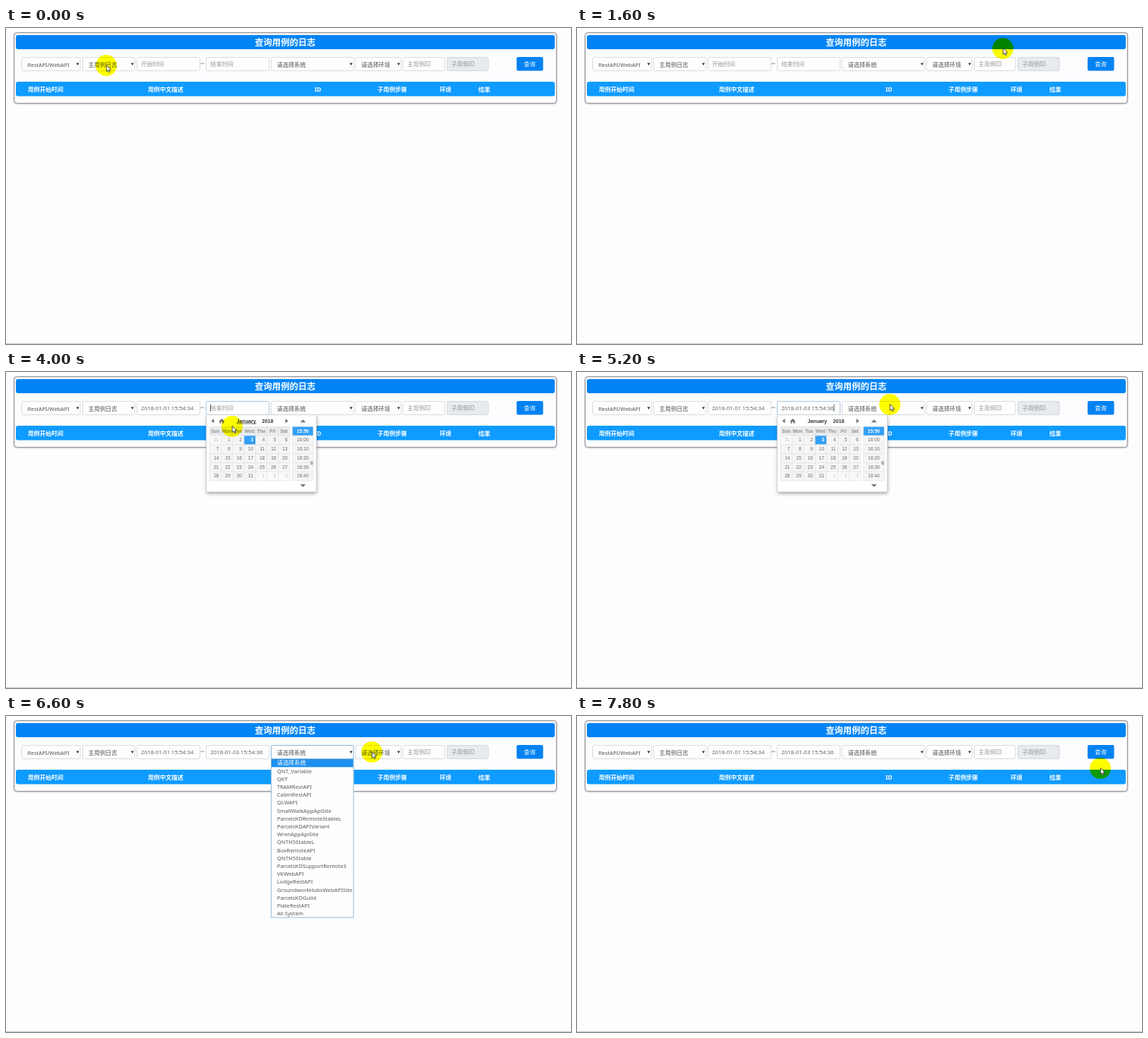
An HTML page with a canvas that plays this animation: 800x447 px, repeating every 8000 ms.

```html
<!DOCTYPE html>
<html lang="zh-CN">
<head>
<meta charset="utf-8">
<title>查询用例的日志</title>
<style>
html, body { margin: 0; width: 100%; height: 100%; overflow: hidden; background: #fdfcfe; }
canvas { display: block; width: 100%; height: 100%; }
</style>
</head>
<body>
<canvas id="stage"></canvas>
<script>
const W = 800, H = 447, LOOP = 8000, STEP = 200;
const SANS = '"Noto Sans", "Noto Sans CJK SC", sans-serif';
const ARIAL = '"Liberation Sans", Arial, sans-serif';
const canvas = document.getElementById('stage');
const ctx = canvas.getContext('2d');
const ratio = window.devicePixelRatio || 1;
canvas.width = Math.round(W * ratio);
canvas.height = Math.round(H * ratio);
ctx.scale(ratio, ratio);

// Pointer path: time, x, y
const path = [
  [0, 142, 53], [400, 290, 54], [800, 490, 53], [1200, 667, 52], [1400, 742, 51],
  [1600, 603, 29], [1800, 480, 40], [2000, 360, 48], [2200, 270, 52], [2400, 224, 53],
  [2600, 232, 64], [2800, 247, 86], [3000, 228, 95], [3200, 216, 98], [3400, 280, 66],
  [3600, 345, 50], [3800, 328, 52], [4000, 320, 77], [4400, 340, 95], [4600, 345, 98],
  [4800, 396, 74], [5000, 426, 54], [5200, 443, 46], [5400, 468, 48], [5600, 486, 51],
  [6000, 487, 54], [6200, 493, 54], [6600, 518, 51], [6800, 536, 47], [7200, 582, 15],
  [7400, 650, 34], [7600, 712, 59], [7800, 741, 74]
];

const systems = [
  '请选择系统', 'QNT_Variable', 'QKT', 'TRAMRestAPI', 'CabinRestAPI', 'QLWAPI',
  'SmallWalkAppApiSite', 'ParcelsKDRemoteStableL', 'ParcelsKDAPIVariant', 'WrenAppApiSite',
  'QNTH5StableL', 'BoxRemoteAPI', 'QNTH5Stable', 'ParcelsKDSupportRemote3', 'VKWebAPI',
  'LodgeRestAPI', 'GroundworkHubsWebAPISite', 'ParcelsKDGuild', 'PlateRestAPI', 'All System'
];

function pointerAt(t) {
  let i = 0;
  while (i < path.length - 1 && path[i + 1][0] <= t) i++;
  const a = path[i], b = path[i + 1] || a;
  const k = b === a ? 0 : (t - a[0]) / (b[0] - a[0]);
  return [a[1] + (b[1] - a[1]) * k, a[2] + (b[2] - a[2]) * k];
}

function text(str, x, y, color, size = 8.2, { bold = false, font = SANS, align = 'left' } = {}) {
  ctx.font = `${bold ? 'bold ' : ''}${size}px ${font}`;
  ctx.textAlign = align;
  ctx.fillStyle = color;
  ctx.fillText(str, x, y);
}

function rect(x, y, w, h, color) {
  ctx.fillStyle = color;
  ctx.fillRect(x, y, w, h);
}

function box(x, y, w, h, r, fill, stroke) {
  ctx.beginPath();
  ctx.roundRect(x, y, w, h, r);
  if (fill) { ctx.fillStyle = fill; ctx.fill(); }
  if (stroke) { ctx.strokeStyle = stroke; ctx.lineWidth = 1; ctx.stroke(); }
}

function poly(points, color) {
  ctx.beginPath();
  points.forEach(([x, y]) => ctx.lineTo(x, y));
  ctx.closePath();
  ctx.fillStyle = color;
  ctx.fill();
}

function withShadow(color, blur, dy, draw) {
  ctx.save();
  ctx.shadowColor = color;
  ctx.shadowBlur = blur * ratio;
  ctx.shadowOffsetY = dy * ratio;
  draw();
  ctx.restore();
}

function field(x, right, border = '#d9dbde', fill = '#fefefe') {
  box(x + 0.5, 41.5, right - x - 1, 19, 2, fill, border);
}

function select(x, right, label, size, open) {
  field(x, right, open ? '#80b5dc' : undefined);
  text(label, x + 8.5, 54.7, '#505050', size);
  poly([[right - 6, 49.5], [right - 2, 49.5], [right - 4, 53]], '#333');
}

function input(x, right, hint, value, focused) {
  field(x, right, focused ? '#a3c8e2' : undefined);
  text(value || hint, x + 6.3, 54, value ? '#606468' : '#92979c', value ? 7.85 : 8.2);
  if (focused) {
    const end = value ? ctx.measureText(value).width + 0.5 : 0;
    rect(x + 6 + end, 45.5, 0.8, 10.5, '#333');
  }
}

function page(t) {
  rect(0, 0, W, H, '#fdfcfe');
  rect(0, 446, W, 1, '#c9c9cb');
  withShadow('rgba(0,0,0,.28)', 2, 0.5, () => box(11.5, 6.5, 768, 100, 4, '#fdfcfe', '#98989b'));
  box(14, 10, 763, 20, 3, '#0084f5');
  text('查询用例的日志', 395.3, 25.2, '#fff', 12.3, { bold: true, align: 'center' });

  select(22, 105.5, 'RestAPI/WebAPI', 7.75);
  select(108, 183, '主用例日志');
  input(185, 275, '开始时间', t >= 3200 && '2018-01-01 15:54:34', t >= 2400 && t < 3800);
  text('--', 275.3, 53, '#444', 8.2);
  input(283, 373, '结束时间', t >= 4600 && '2018-01-03 15:54:36', t >= 3800 && t < 5600);
  select(375, 492.5, '请选择系统', 8.2, t >= 5600 && t < 6800);
  select(494.5, 560, '请选择环境');
  input(562, 621.5, '主用例ID');
  field(624, 683.5, '#d2d6da', '#e8ebee');
  text('子用例ID', 630.3, 54, '#8b949b');
  box(723, 41, 37.5, 19.5, 2, '#0082f2');
  text('查询', 741.5, 54, '#fff', 8.2, { align: 'center' });

  box(14, 76, 763, 20.5, 3, '#0f9bff');
  const heads = [['用例开始时间', 31], ['用例中文描述', 201], ['ID', 437],
    ['子用例步骤', 526], ['环境', 614], ['结果', 669]];
  for (const [label, x] of heads) text(label, x, 89.5, '#fff', 8.35, { bold: true });
}

function calendar(x, chosen, underline) {
  const top = 77, row = 12.75, col = 16.2, left = x + 4.8;
  const small = (s, px, py, color, bold, align = 'center') =>
    text(s, px, py, color, 6.6, { bold, align, font: ARIAL });

  withShadow('rgba(60,60,60,.55)', 5, 2, () => rect(x, 60.5, 156, 109.5, '#fff'));
  ctx.strokeStyle = '#c8c8c8';
  ctx.lineWidth = 0.7;
  ctx.strokeRect(x + 0.3, 60.7, 155.4, 109);

  const grey = '#747474';
  poly([[x + 11, 66], [x + 11, 72.5], [x + 7, 69.2]], grey);
  poly([[x + 112, 66], [x + 112, 72.5], [x + 116, 69.2]], grey);
  poly([[x + 18, 69.6], [x + 22, 66], [x + 26, 69.6], [x + 25, 69.6], [x + 25, 72.8], [x + 23, 72.8],
    [x + 23, 70.6], [x + 21, 70.6], [x + 21, 72.8], [x + 19, 72.8], [x + 19, 69.6]], grey);
  poly([[x + 133, 71.2], [x + 137, 67.2], [x + 141, 71.2]], grey);
  poly([[x + 133, 158.7], [x + 137, 162.7], [x + 141, 158.7]], grey);
  text('January', x + 43, 71.8, '#333', 7.2, { bold: true, font: ARIAL });
  text('2018', x + 79, 71.8, '#333', 7.2, { bold: true, font: ARIAL });
  if (underline) rect(x + 43, 72.7, 28, 0.7, '#333');

  rect(left, top, col * 7, row, '#ececee');
  rect(left, top + row, col * 7, row * 5, '#f5f5f6');
  rect(x + 122, top, 29.5, row * 6, '#f5f5f6');
  ['Sun', 'Mon', 'Tue', 'Wed', 'Thu', 'Fri', 'Sat'].forEach((d, i) =>
    small(d, left + col * (i + 0.5), top + 8.7, '#909090', true));

  for (let i = 0; i < 35; i++) {
    const cx = left + col * (i % 7), cy = top + row * (1 + Math.floor(i / 7));
    const outside = i === 0 || i > 31;
    const day = i === 0 ? 31 : i > 31 ? i - 31 : i;
    const on = !outside && day === chosen;
    if (outside) rect(cx, cy, col, row, '#fafafb');
    if (on) rect(cx, cy, col, row, '#32a0f6');
    small(String(day), cx + col - 3, cy + 8.7, on ? '#fff' : outside ? '#c4c4c4' : '#6a6a6a', on, 'right');
  }
  for (let i = 0; i < 6; i++) {
    const cy = top + row * i, min = 950 + i * 10;
    if (!i) rect(x + 122, cy, 29.5, row, '#32a0f6');
    const label = Math.floor(min / 60) + ':' + String(min % 60).padStart(2, '0');
    small(label, x + 136.8, cy + 8.7, i ? '#6a6a6a' : '#fff', !i);
  }

  const line = '#dcdcde';
  for (let i = 0; i <= 6; i++) {
    rect(left, top + row * i, col * 7, 0.6, line);
    rect(x + 122, top + row * i, 29.5, 0.6, line);
  }
  for (let i = 0; i <= 7; i++) rect(left + col * i, top, 0.6, row * 6, line);
  rect(x + 122, top, 0.6, row * 6, line);
  rect(x + 151.2, top, 0.6, row * 6, line);
  box(x + 147.5, 126, 4, 5.2, 1, '#b4b4b6');
}

function dropdown() {
  rect(375, 60.5, 117.5, 225, '#fefefe');
  rect(375.5, 61, 116.5, 11.3, '#1e90f0');
  systems.forEach((name, i) =>
    text(name, 383.7, 69.4 + i * 11.2, i ? '#585858' : '#fff', i ? 7.75 : 8.2));
  ctx.strokeStyle = '#8fbbd4';
  ctx.lineWidth = 1;
  ctx.strokeRect(375.5, 60.5, 116.5, 224.5);
}

function pointer(t) {
  const [x, y] = pointerAt(t);
  ctx.save();
  ctx.globalCompositeOperation = 'multiply';
  ctx.beginPath();
  ctx.arc(x, y, 15, 0, Math.PI * 2);
  ctx.fillStyle = '#ffff00';
  ctx.fill();
  ctx.restore();
  ctx.save();
  ctx.translate(x + 0.3, y - 0.5);
  poly([[0, 0], [0, 9], [2, 7.2], [3.4, 10.2], [4.8, 9.5], [3.5, 6.6], [6.2, 6.4]], '#fff');
  ctx.strokeStyle = '#222';
  ctx.lineWidth = 0.8;
  ctx.stroke();
  ctx.restore();
}

function draw(now) {
  const t = Math.floor((now % LOOP) / STEP) * STEP;
  page(t);
  if (t >= 2600 && t < 3800) calendar(185, t < 3200 ? 3 : 1, false);
  if (t >= 3800 && t < 5600) calendar(283.5, 3, t < 4200);
  if (t >= 5800 && t < 6800) dropdown();
  pointer(t);
}

const start = performance.now();
function tick() {
  draw(performance.now() - start);
  requestAnimationFrame(tick);
}
tick();
</script>
</body>
</html>
```
